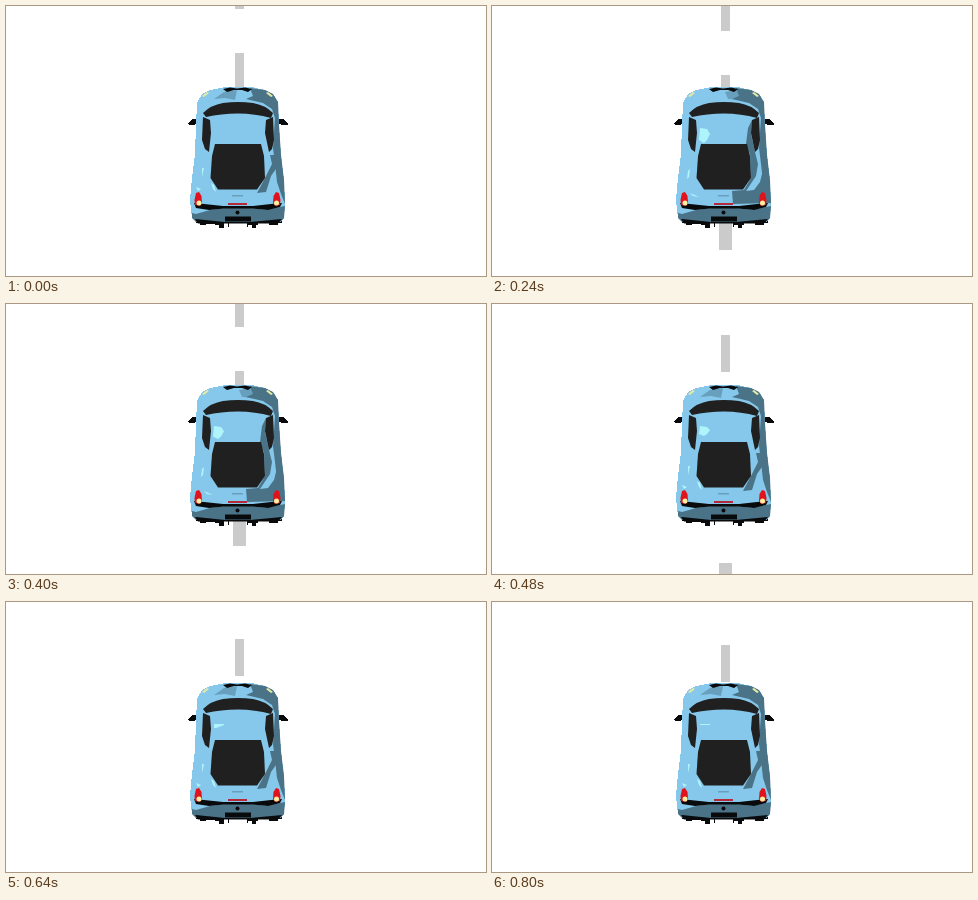
Animation, 480 px wide and 270 px high, one loop 0.88 s. Source, as an HTML page:

```html
<!DOCTYPE html>
<html lang="en">
<head>
<meta charset="utf-8">
<title>Car on the road</title>
<style>
  html, body { margin: 0; width: 100%; height: 100%; overflow: hidden; background: #fff; }
  svg { display: block; width: 100vw; height: 100vh; }
  .road { fill: #cbcbcb; }
  .road, .edge { shape-rendering: crispEdges; }
  .body { fill: #86c8eb; }
  .mid { fill: #689fbd; }
  .dark { fill: #4a7388; }
  .glass { fill: #202020; }
  .black { fill: #080a0c; }
  .red { fill: #e0121c; }
  .glow { fill: #b0f4fb; }
</style>
</head>
<body>
<svg viewBox="0 0 480 270">
  <g class="road">
    <rect id="far" x="229" width="9" height="37"/>
    <rect id="near" x="229" width="9" height="37"/>
    <rect id="rear" x="227" width="13" height="37"/>
  </g>

  <!-- mirrors and underside -->
  <g class="black edge">
    <path d="M182 118L185 114L189 112.500L193 114L192 117L188 119H183Z"/>
    <path d="M282 118L279 114L275 112.500L271 114L272 117L276 119H281Z"/>
    <path d="M190 213H276V217H272V219H263V217H252V219H250V222H246V219H242V221H241V217H223V221H222V217H218V222H213V219H209V218H200V219H194V217H190Z"/>
  </g>

  <!-- shell -->
  <path class="body edge" d="M219 81H246L259 84L267 88L272 96L273 119L275 149L278 174L279 198L278 212L274 216L244 217H219L190 216L186 212L184 194L186 172L189 148L190 119L191 97L196 88L204 84Z"/>
  <path id="hood" class="mid"/>
  <path class="dark" d="M244 82L259 84L267 88L272 96L273 119L275 149L278 174L279 198L275 188L271 176L269 158L267 142L269 112L266 103L257 97L240 93L247 90Z"/>
  <path class="black" d="M217 83L224 81.500L231 82.500L239 81.500L246 83L242 86L236 84H228L221 86Z"/>
  <path fill="#e5e9a4" d="M196 90L201 86L203 87L198 91ZM267 90L262 86L260 87L265 91Z"/>
  <path id="side" class="dark"/>

  <!-- cabin -->
  <path class="glass" d="M197 107Q205 99 217 97Q232 95 247 97Q259 99 267 107L265 112Q249 107.500 232 107.500Q215 107.500 200 111Z"/>
  <path class="glass" d="M197 111L204 114L205 127L203 146L199 143L196 134ZM267 111L260 114L259 127L263 146L266 143L268 134Z"/>
  <path id="roof" class="glow"/>
  <path class="glass" d="M209 138H255L258 150L259 172L251 183.500H212L204.500 172L206 150Z"/>

  <!-- tail -->
  <path class="mid" d="M226 189H237V190.500H226Z"/>
  <path class="dark" d="M186 205L204 204L220 202H244L260 204L279 200L278 212L274 216L244 217H219L190 216L186 212Z"/>
  <path class="body" d="M185 202L204 204L190 208L186 207Z"/>
  <path class="black" d="M188 197L198 198L217 200H247L265 198L276 197L274 201L262 204L246 202.500H218L203 204L190 202Z"/>
  <path fill="#b52a38" d="M222 197H241V199H222Z"/>
  <path class="black" d="M219 210.500H245V215.500H219ZM189 213L219 216H244L276 213L272 217.500H192Z"/>
  <circle class="black" cx="231.500" cy="206.500" r="2"/>
  <path class="red" d="M190 187L193 186L195.500 190L196 197L194 200L189 199L188.500 194Z"/>
  <path class="red" d="M273 187L270 186L267.500 190L267 197L269 200L274 199L274.500 194Z"/>
  <g fill="#fff0a0">
    <circle cx="193" cy="197" r="2.500"/><circle cx="270.500" cy="197" r="2.500"/>
  </g>
  <path id="spark" class="glow"/>
</svg>
<script>
const STEP = 80;
// [front dash top, rear dash top, roof glint height, look]
const steps = [
  [47, 280, 0, 1], [81, 219, 15, 0], [31, 262, 17, 0], [69, 207, 15, 0],
  [27, 253, 16, 0], [67, 205, 13, 0], [31, 259, 10, 1], [71, 209, 14, 0],
  [37, 274, 4, 1], [74, 212, 15, 0], [43, 277, 1, 1]
];
// reflections with the light overhead, then from the left
const looks = [
  {
    hood: "M233 86L246 84L250 94L236 93Z",
    side: "M260 114L256 122L254 138L258 148L259 172L252 184L240 185L241 198L279 197L276 174L271 164L268 176L262 184L254 185L264 170L266 158L263 146L259 128Z",
    spark: "M196 165L198 163L197 171L195 173ZM198 187L207 191L201 190Z"
  },
  {
    hood: "M208 93L218 86L231 84L229 94L219 92Z",
    side: "M264 149L273 149L272 160L265 170L260 186L251 187L259 172L266 158Z",
    spark: "M205 177L208 179L210 186L207 183ZM196 162L198 162L196 171ZM190 181L195 183L192 185Z"
  }
];
const $ = id => document.getElementById(id);
const path = (id, d) => $(id).setAttribute("d", d);

function roofGlint(h) {
  if (!h) return "";
  const y = 122;
  return h < 6
    ? `M208 ${y}H218V${y + 1}L210 ${y + h}H208Z`
    : `M208 ${y}L215 ${y + 1}L218 ${y + h * .4}L215 ${y + h * .8}L212 ${y + h}L207 ${y + h * .8}Z`;
}

let last = -1;
function draw(now) {
  const k = Math.floor(now / STEP) % steps.length;
  if (k === last) return;
  const [front, rear, glint, look] = steps[last = k];
  $("far").setAttribute("y", front - 81);
  $("near").setAttribute("y", front);
  $("rear").setAttribute("y", rear);
  path("roof", roofGlint(glint));
  for (const id in looks[look]) path(id, looks[look][id]);
}
const start = performance.now();
function tick() {
  draw(performance.now() - start);
  requestAnimationFrame(tick);
}
tick();
</script>
</body>
</html>
```
